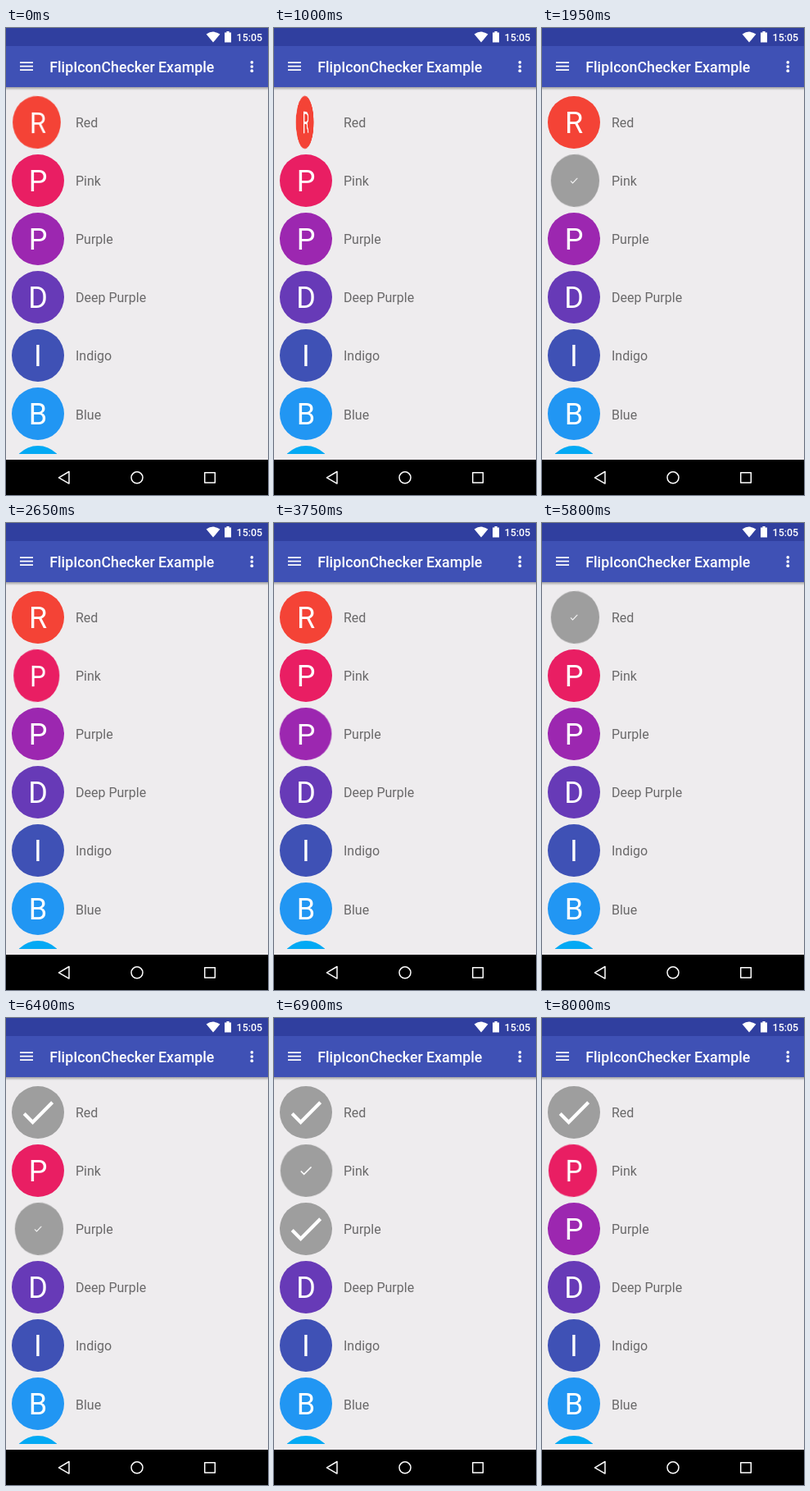
These frames come from a looping animation (320x569 px, 8.05 s). An HTML page:

```html
<!DOCTYPE html>
<html lang="en">
<head>
<meta charset="utf-8">
<title>FlipIconChecker Example</title>
<style>
  html, body { margin: 0; width: 100%; height: 100%; overflow: hidden; background: #eeecee; }
  svg { display: block; font-family: Roboto, sans-serif; }
  #screen { position: absolute; left: 0; top: 0; }
  #icons { position: absolute; left: 0; top: 0; width: 320px; height: 519px; overflow: hidden; }
  .icon { position: absolute; left: 7px; width: 64px; height: 64px; }
  .icon svg { position: absolute; left: 0; top: 0; overflow: visible; }
</style>
</head>
<body>
<svg id="screen" width="320" height="569" viewBox="0 0 320 569">
  <defs>
    <linearGradient id="shade" x2="0" y2="1">
      <stop stop-color="#000" stop-opacity=".32"/>
      <stop offset="1" stop-color="#000" stop-opacity="0"/>
    </linearGradient>
  </defs>
  <rect width="320" height="569" fill="#eeecee"/>
  <rect y="72" width="320" height="4" fill="url(#shade)"/>
  <rect width="320" height="72" fill="#3f51b5"/>
  <rect width="320" height="22" fill="#303f9f"/>
  <g fill="#fff">
    <path d="M244.6 7.6Q253 1.6 261.4 7.6L253 17.6z"/>
    <path d="M267 5.5h2.4V4h3.2v1.5h2.4v12h-8z"/>
    <text x="281.6" y="16" font-size="12.44" font-weight="500">15:05</text>
    <path d="M17 41.2h16v1.7h-16zM17 45.7h16v1.7h-16zM17 50.2h16v1.7h-16z"/>
    <circle cx="300.3" cy="41.8" r="1.85"/>
    <circle cx="300.3" cy="47" r="1.85"/>
    <circle cx="300.3" cy="52.2" r="1.85"/>
    <text x="53.3" y="54" font-size="17.78" font-weight="500">FlipIconChecker Example</text>
  </g>
  <g id="labels" font-size="16" fill="#6a696a"></g>
  <rect y="526" width="320" height="43" fill="#000"/>
  <g fill="none" stroke="#fff" stroke-width="1.5" stroke-linejoin="round">
    <path d="M64.5 547.8L77 540.5v14.6z"/>
    <circle cx="160" cy="547.8" r="7"/>
    <rect x="242.7" y="541.7" width="12.6" height="12.2"/>
  </g>
</svg>
<div id="icons"></div>
<script>
const LOOP = 8050, FLIP = 300, CHECK_DELAY = 150, CHECK_TIME = 300;
const TOP = 114.8, PITCH = 71.1;

// flips: start times, alternating between checking and unchecking
const rows = [
  { name: 'Red', color: '#f44336', flips: [-70, 830, 5570] },
  { name: 'Pink', color: '#e91e63', flips: [1720, 2430, 6640, 7770] },
  { name: 'Purple', color: '#9c27b0', flips: [3717, 4580, 6170, 7430] },
  { name: 'Deep Purple', color: '#673ab7', flips: [] },
  { name: 'Indigo', color: '#3f51b5', flips: [] },
  { name: 'Blue', color: '#2196f3', flips: [] },
  { name: 'Light Blue', color: '#03a9f4', flips: [] }
];

const clamp = x => Math.min(1, Math.max(0, x));
const ease = x => (1 - Math.cos(Math.PI * clamp(x))) / 2;

const face = (color, content) =>
  `<svg width="64" height="64" viewBox="-32 -32 64 64"><circle r="32" fill="${color}"/>${content}</svg>`;

rows.forEach((row, i) => {
  const y = TOP + PITCH * i;
  const icon = document.createElement('div');
  icon.className = 'icon';
  icon.style.top = y - 32 + 'px';
  icon.innerHTML =
    face(row.color, `<text y="13.2" font-size="36" fill="#fff" text-anchor="middle">${row.name[0]}</text>`) +
    face('#9e9e9e', '<path fill="#fff" d="M9 16.17L4.83 12l-1.42 1.41L9 19 21 7l-1.41-1.41z"/>');
  document.getElementById('icons').append(icon);
  [row.front, row.rear] = icon.children;
  row.check = row.rear.querySelector('path');

  if (y > 519) return;
  const label = document.createElementNS('http://www.w3.org/2000/svg', 'text');
  label.setAttribute('x', 85);
  label.setAttribute('y', y + 6.2);
  label.textContent = row.name;
  document.getElementById('labels').append(label);
});

function pose(flips, t) {
  const started = flips.filter(start => start <= t);
  if (!started.length) return { turn: 0, check: 1 };
  const age = t - started[started.length - 1];
  const turn = ease(age / FLIP);
  return started.length % 2
    ? { turn, check: 0.1 + 0.9 * ease((age - CHECK_DELAY) / CHECK_TIME) }
    : { turn: 1 - turn, check: 1 };
}

function draw(t) {
  for (const row of rows) {
    const { turn, check } = pose(row.flips, t);
    const isRear = turn >= 0.5;
    const angle = 180 * (isRear ? turn - 1 : turn);
    row.front.style.display = isRear ? 'none' : 'block';
    row.rear.style.display = isRear ? 'block' : 'none';
    (isRear ? row.rear : row.front).style.transform =
      angle ? `perspective(250px) rotateY(${angle}deg)` : 'none';
    row.check.setAttribute('transform', `scale(${2.13 * check}) translate(-12 -12)`);
  }
}

const begin = performance.now();
function tick() {
  draw((performance.now() - begin) % LOOP);
  requestAnimationFrame(tick);
}
tick();
</script>
</body>
</html>
```
